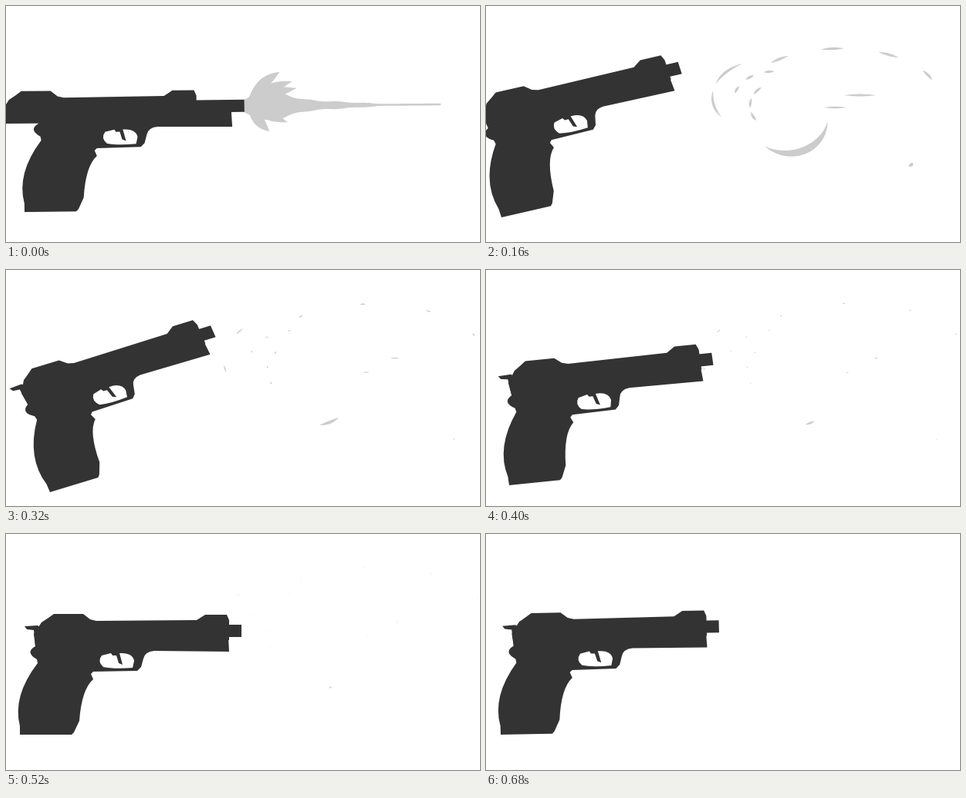
Write an HTML page with a canvas that moves like this. It is 614 px wide and 307 px high and loops after 720 ms.

```html
<!DOCTYPE html>
<html lang="en">
<head>
<meta charset="utf-8">
<title>Recoil</title>
<style>
  html, body { margin: 0; width: 100%; height: 100%; overflow: hidden; background: #fff; }
  canvas { display: block; }
</style>
</head>
<body>
<canvas id="stage" width="614" height="307"></canvas>
<script>
const ctx = document.getElementById('stage').getContext('2d');
const LOOP = 720, STEP = 40;
const METAL = '#333', SMOKE = '#cccccc';
const rad = degrees => degrees * Math.PI / 180;

// Gun parts, drawn level
const frame = new Path2D(
  'M24 120 L41 119 60 134 288 133.5 289 153 192 152 Q180 153 178 162 L175 173 170 178 113 179 ' +
  '110 182 113 189 Q98 202 95 243 L88 258 85 261 18 261 18 250 Q8 211 41 168 L40 163 ' +
  'Q24 154 38 146 L36 125 27 124Z ' +
  'M124 158 L136 155 138 158 143 158 146 168 151 170 147 155 Q164 154 166 165 L164 174 ' +
  'Q140 176 126 173 Q118 166 124 158Z');
const slide = new Path2D(
  'M36 130 L46 115 55 109 62 104 100 104 109 111 117 113 247 112 258 105 286 105 289 112 ' +
  '289 138 110 138 110 146 38 146Z');
const butt = [18, 261], muzzle = [287, -143], neck = [23, -93];

// time, butt x, butt y, tilt in degrees, slide travel
const poses = [
  [0, 24, 268, 0.7, -46],
  [80, 22, 275, 12.5, -70],
  [160, 20, 275, 15, 0],
  [320, 57, 289, 19.7, 0],
  [400, 30, 280, 6.8, 0],
  [520, 18, 261, 0, 0],
  [640, 18, 260, 2, 0],
  [680, 19, 261, 1.3, 0]
];

// Smooth spline through unevenly spaced poses
function poseAt(t) {
  const last = poses.length - 1;
  let i = 0;
  while (i < last - 1 && t >= poses[i + 1][0]) i++;
  const p = poses[i], q = poses[i + 1];
  const before = poses[Math.max(i - 1, 0)], after = poses[Math.min(i + 2, last)];
  const h = q[0] - p[0], k = Math.min((t - p[0]) / h, 1);
  return p.slice(1).map((v, n) => {
    const end = q[n + 1];
    const m0 = (end - before[n + 1]) / (q[0] - before[0]) * h;
    const m1 = (after[n + 1] - v) / (after[0] - p[0]) * h;
    return v + (end - v) * k * k * (3 - 2 * k) + m0 * k * (1 - k) ** 2 - m1 * k * k * (1 - k);
  });
}

function turn([x, y], degrees, scale = 1) {
  const c = Math.cos(rad(degrees)) * scale, s = Math.sin(rad(degrees)) * scale;
  return [x * c + y * s, y * c - x * s];
}

function drawGun(t) {
  const [x, y, tilt, travel] = poseAt(t);
  // The barrel foreshortens as it rises and the grip leans a little further
  const barrel = turn(muzzle, tilt, 1 - 0.0032 * tilt);
  const grip = turn(neck, tilt * 1.22);
  const det = muzzle[0] * neck[1] - muzzle[1] * neck[0];
  const axis = n => [
    (barrel[n] * neck[1] - grip[n] * muzzle[1]) / det,
    (grip[n] * muzzle[0] - barrel[n] * neck[0]) / det
  ];
  const [a, c] = axis(0), [b, d] = axis(1);
  ctx.save();
  ctx.transform(a, b, c, d, x, y);
  ctx.translate(-butt[0], -butt[1]);
  ctx.fillStyle = METAL;
  ctx.fill(frame, 'evenodd');
  ctx.fillRect(200, 118, 105, 16);
  ctx.fillRect(200, 130, 88, 8);
  ctx.translate(Math.min(travel, 0), 0);
  ctx.fill(slide);
  ctx.restore();
}

function fillShape(points) {
  ctx.beginPath();
  points.forEach(p => ctx.lineTo(...p));
  ctx.fill();
}

// Fills a band of varying width along a curve
function ribbon(curve, width, samples = 40) {
  const left = [], right = [];
  for (let n = 0; n <= samples; n++) {
    const k = n / samples, [x, y] = curve(k), [x2, y2] = curve(k + 0.001);
    const len = Math.hypot(x2 - x, y2 - y) || 1, half = width(k) / 2;
    const ox = (y2 - y) / len * half, oy = (x2 - x) / len * half;
    left.push([x + ox, y - oy]);
    right.unshift([x - ox, y + oy]);
  }
  fillShape([...left, ...right]);
}

const lens = w => k => w * Math.sin(Math.PI * k) + 0.4;

function line(x0, y0, x1, y1, width, bow = 0) {
  ribbon(k => [x0 + (x1 - x0) * k, y0 + (y1 - y0) * k - bow * Math.sin(Math.PI * k)], lens(width));
}

function drawFlash() {
  ribbon(k => [308 + 255 * k, 130 - 2 * k], k => {
    const x = 255 * k;
    const body = 11 * (1 - x / 205) + 10 * Math.exp(-(((x - 34) / 30) ** 2)) + Math.sin(x / 6) * (1 - k);
    return 2 * Math.max(1.3, Math.min(body, 8 + x * 0.5));
  }, 80);
  const tips = [[354, 86], [370, 98], [376, 107], [364, 151], [341, 163]];
  tips.forEach(([x, y]) => line(312, 126, x, y, 13, (130 - y) / 10));
}

// Smoke is made of arcs cut from a few ellipses
const arcs = [];
function ring(cx, cy, rx, ry, first, step, count, span, width) {
  for (let i = 0; i < count; i++) arcs.push({ cx, cy, rx, ry, mid: first + i * step, span, width });
}
ring(362, 118, 69, 48, 168, 54, 2, 42, 3);
ring(460, 115, 125, 60, 230, 35, 4, 13, 3);
ring(372, 130, 30, 28, 150, 38, 3, 26, 3);
ring(372, 125, 52, 40, 204, 30, 3, 14, 3);
ring(392, 145, 51, 47, 67, 0, 1, 118, 9);
ring(453, 132, 40, 0, 90, 0, 1, 40, 2);
ring(485, 116, 57, 0, 90, 0, 1, 40, 2.5);
ring(548, 204, 5, 4, 45, 0, 1, 90, 4);

// Arcs fly outwards, slow down and shrink to specks
function drawArcs(t) {
  const grow = 1.18 - 0.5 * Math.exp((80 - t) / 80);
  const life = Math.exp((160 - t) / 105);
  for (const { cx, cy, rx, ry, mid, span, width } of arcs) {
    const arc = span * Math.min(life, 1.3);
    ribbon(k => {
      const a = rad(mid + (k - 0.5) * arc);
      return [
        365 + (cx + rx * Math.cos(a) - 365) * grow,
        125 + (cy + ry * Math.sin(a) - 125) * grow
      ];
    }, lens(width * life ** 0.6));
  }
}

// Dense underside of the young cloud, with feathers rising from it
function drawBelly() {
  fillShape([[314, 151], [342, 160], [390, 163], [440, 140], [438, 152], [412, 170],
    [412, 183], [373, 176], [371, 188], [335, 177]]);
  for (let i = 0; i < 5; i++) {
    line(336 + 18 * i, 126 + 3 * i, 352 + 16 * i, 168 - 3 * i, 11, -5);
  }
  for (let i = 0; i < 3; i++) {
    line(340 + 15 * i, 100 - 4 * i, 382 + 8 * i, 71 + 10 * i, 5, 8);
  }
}

function drawSmoke(t) {
  ctx.fillStyle = SMOKE;
  if (t < 40) {
    drawFlash();
  } else if (t < 80) {
    ctx.beginPath();
    ctx.ellipse(380, 128, 62, 42, 0, 0, 2 * Math.PI);
    ctx.fill();
  } else if (t < 560) {
    if (t < 120) drawBelly();
    drawArcs(t);
  }
}

function render() {
  const t = Math.floor(performance.now() % LOOP / STEP) * STEP;
  ctx.fillStyle = '#fff';
  ctx.fillRect(0, 0, 614, 307);
  drawSmoke(t);
  drawGun(t);
  requestAnimationFrame(render);
}
render();
</script>
</body>
</html>
```
